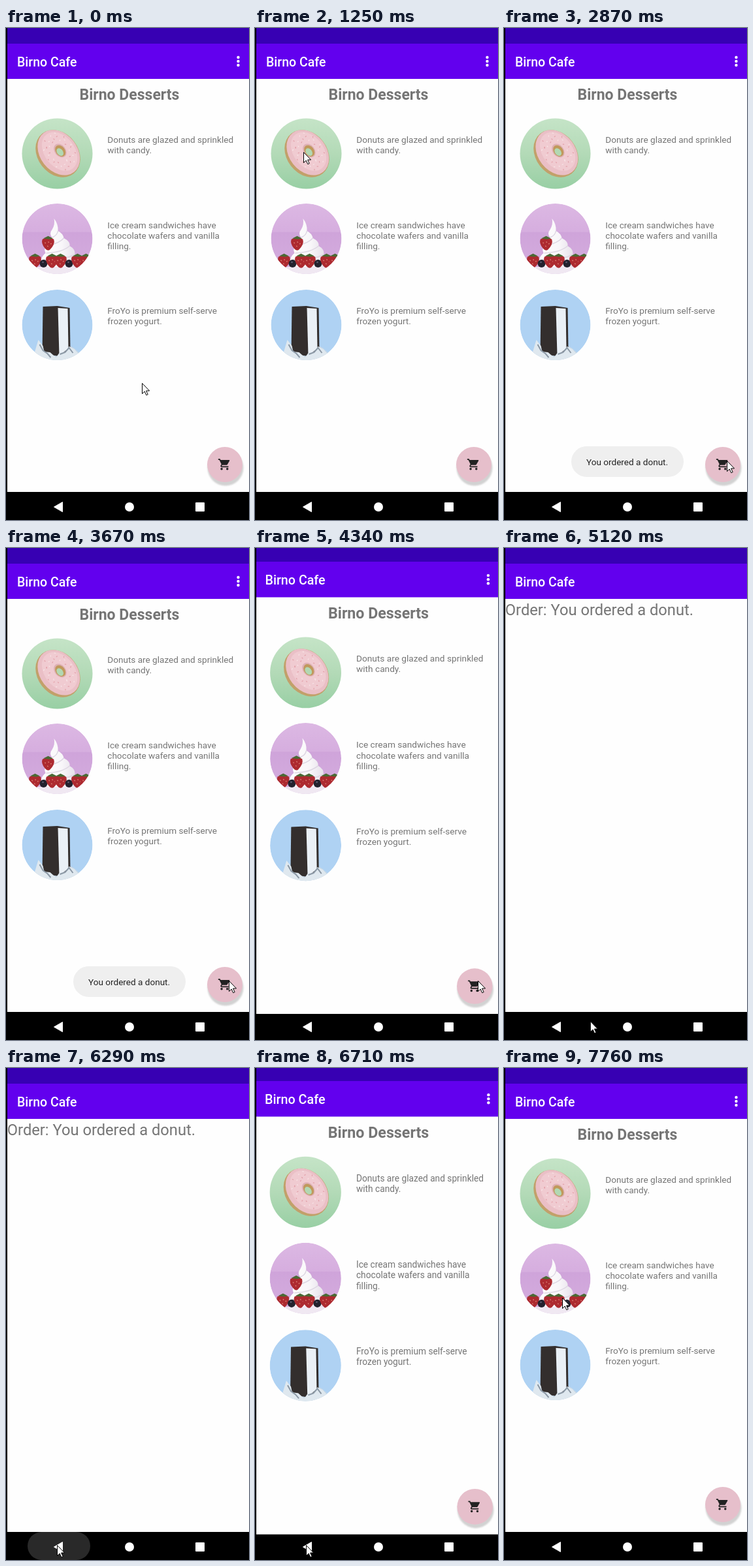
An HTML page that plays this animation: 372x754 px, repeating every 8 s.

```html
<!DOCTYPE html>
<html lang="en">
<head>
<meta charset="utf-8">
<title>Birno Cafe</title>
<style>
  html, body { margin: 0; height: 100%; overflow: hidden; background: #000; }
  svg { display: block; font-family: Roboto, sans-serif; }
  .title { font-size: 19.5px; font-weight: 500; fill: #fff; }
  .heading { font-size: 23px; font-weight: 700; fill: #757575; text-anchor: middle; }
  .text { font-size: 13.57px; fill: #757575; }
  .toast { font-size: 13.57px; fill: #222; }
  .order { font-size: 23.7px; fill: #757575; }
</style>
</head>
<body>
<svg width="372" height="754" viewBox="0 0 372 754">
  <defs>
    <linearGradient id="green" x2="0" y2="1">
      <stop offset="0" stop-color="#c5e4c7"/><stop offset=".5" stop-color="#b3dab7"/><stop offset="1" stop-color="#98cfa4"/>
    </linearGradient>
    <linearGradient id="purple" x2="0" y2="1">
      <stop offset="0" stop-color="#dcb8e3"/><stop offset=".4" stop-color="#d6aedf"/>
      <stop offset=".41" stop-color="#cfa4da"/><stop offset="1" stop-color="#d5aedf"/>
    </linearGradient>
    <linearGradient id="cream" x2="1">
      <stop offset="0" stop-color="#fff"/><stop offset=".6" stop-color="#f8f6f9"/><stop offset="1" stop-color="#e5dfe9"/>
    </linearGradient>
    <filter id="soft"><feGaussianBlur stdDeviation="1"/></filter>
    <clipPath id="disc"><circle r="54"/></clipPath>
    <clipPath id="screen"><path d="M2 0H372V754H2z"/></clipPath>
    <g id="strawberry" transform="scale(1.25)">
      <path d="M-7-5Q0-9 7-5Q9 1 2 8Q-1 10-4 6Q-9 0-7-5z" fill="#ad2a30"/>
      <path d="M-4-1l1 1M0-2l1 1M4 0l-1 1M-1 3l1 1" stroke="#dd8577"/>
      <path d="M-6-6L-2-8 0-9 2-8 6-6 1-5z" fill="#4a6a35"/>
    </g>
    <g id="blueberry"><circle r="6" fill="#23222e"/><circle cx="-1" cy="-2" r="1.3" fill="#5b5c72"/></g>
    <g id="base">
      <path d="M2 0H372V711H2z" fill="#fefefe"/>
      <path d="M2 0H372V24H2z" fill="#3700b3"/>
      <path d="M2 24H372V78H2z" fill="#6200ee"/>
      <text class="title" x="17" y="58.5">Birno Cafe</text>
    </g>
  </defs>

  <g clip-path="url(#screen)">
    <g id="menu">
      <use href="#base"/>
      <g fill="#fff"><circle cx="355.5" cy="45" r="2.2"/><circle cx="355.5" cy="51" r="2.2"/><circle cx="355.5" cy="57" r="2.2"/></g>
      <text class="heading" x="189" y="110">Birno Desserts</text>

      <g transform="translate(78.5 192.5)">
        <circle r="54" fill="url(#green)"/>
        <g transform="translate(1) rotate(52)">
          <ellipse rx="39" ry="31" fill="#c2a06a"/>
          <ellipse cx="-.5" cy="-2" rx="38" ry="28.5" fill="#eabfc6"/>
          <ellipse cx="-1" cy="-4" rx="33" ry="23" fill="#f0cbd1"/>
          <g id="sprinkles" stroke-width="1.2" stroke-linecap="round"></g>
          <ellipse cx="-1.5" cy="-5.5" rx="11.5" ry="8.5" fill="#deb0b4"/>
          <ellipse cx="-1" cy="-5.5" rx="9.5" ry="7" fill="#c0995c"/>
          <ellipse cy="-4" rx="6.5" ry="4.5" fill="#b2d8b3"/>
        </g>
      </g>

      <g transform="translate(78.5 323)"><g clip-path="url(#disc)">
        <circle r="54" fill="url(#purple)"/>
        <path d="M-54 43H54V54H-54z" fill="#f0e8f2"/>
        <path d="M-5-31Q2-22 1-12Q9-8 10-1Q20 4 19 11Q28 16 27 24Q30 34 27 43H-24Q-28 30-18 22Q-22 14-14 10Q-16 2-8-2Q-13-8-8-14Q-3-22-5-31z" fill="url(#cream)"/>
        <path d="M1-12Q0-5-8-2M10-1Q3 7-13 10M19 11Q7 21-17 22M27 24Q7 34-20 32" fill="none" stroke="#ddd6e2" stroke-width="1.5"/>
        <use href="#strawberry" x="-14" y="7"/>
        <g id="berries"></g>
      </g></g>

      <g transform="translate(78.5 455)"><g clip-path="url(#disc)">
        <circle r="54" fill="#afd2f3"/>
        <path d="M-29 24l7 8 22-3 18 2 8 5 10 9-4 12H-32l-2-14z" fill="#c6d7e6"/>
        <path d="M-22-28L0-29 19-26 20 37 3 48-23 44z" fill="#332e2d"/>
        <path d="M1-26L16-25 17 36 3 47z" fill="#eaf0f6"/>
        <path d="M-29 23l7 9 2 9 9 1 9 8 5-7 9-2 6-8 8 4 8 9-4 9H-31l-4-12z" fill="#dfe8ef"/>
        <path d="M-27 30l5 9 7 5 5 6M4 45l8-3 6-7 6 8" fill="none" stroke="#8b98a5" stroke-width="2"/>
      </g></g>

      <g id="captions" class="text"></g>

      <circle id="shadow" cx="336" cy="674" r="27.5" fill="#d2d2d2" filter="url(#soft)"/>
      <circle cx="335" cy="669" r="27" fill="#e6bfcb"/>
      <circle id="press" cx="335" cy="669" r="24" fill="#fff"/>
      <path transform="translate(324 658.4) scale(.87)" fill="#222" d="M7 18a2 2 0 1 0 0 4a2 2 0 1 0 0-4zM1 2v2h2l3.6 7.6-1.35 2.45C4.5 15.4 5.5 17 7 17h12v-2H7.4q-.3-.1-.2-.4l.9-1.6h7.45q1.2 0 1.75-1l3.6-6.5A1 1 0 0 0 20 4H5.2l-.9-2zM17 18a2 2 0 1 0 0 4a2 2 0 1 0 0-4z"/>
    </g>

    <g id="order">
      <use href="#base"/>
      <text class="order" x="1.8" y="103">Order: You ordered a donut.</text>
    </g>

    <g id="toast">
      <rect x="103" y="641" width="172" height="47" rx="23.5" fill="#efefef"/>
      <text class="toast" x="126" y="670">You ordered a donut.</text>
    </g>

    <rect id="ripple" x="33" y="711" width="96" height="43" rx="21.5" fill="#fff" opacity=".16"/>
    <g fill="#fff">
      <path d="M73.5 734L86.5 726.5V741.5z" stroke="#fff" stroke-linejoin="round"/>
      <circle cx="189" cy="734" r="7"/>
      <rect x="290" y="727" width="14" height="14" rx="1"/>
    </g>
  </g>

  <path id="cursor" d="M.5.5V16.5L4.2 13 6.8 18.7 9.2 17.6 6.6 12H11.6z" fill="#fff" stroke="#000"/>
</svg>

<script>
const LOOP = 8000;
const el = id => document.getElementById(id);
const set = (id, name, value) => el(id).setAttribute(name, value);
const ramp = (t, start, end) => Math.min(1, Math.max(0, (t - start) / (end - start)));
const easeOut = p => p * (2 - p);
const zoom = s => `translate(187 377) scale(${s}) translate(-187 -377)`;

// Pointer gestures: start, end, target x, target y.
const home = [208, 544];
const gestures = [
  [620, 960, 21, 175], [960, 1250, 74, 190],   // tap the donut
  [2380, 2850, 341, 663],                      // to the cart
  [4650, 5120, 132, 725], [5120, 5700, 78, 731], // to the back button
  [7080, 7320, 61, 397], [7320, 7760, 89, 352] // to the next dessert
];
const pointer = t => gestures.reduce(([x, y], [start, end, toX, toY]) => {
  const p = easeOut(ramp(t, start, end));
  return [x + (toX - x) * p, y + (toY - y) * p];
}, home);

const captions = [
  ['Donuts are glazed and sprinkled', 'with candy.'],
  ['Ice cream sandwiches have', 'chocolate wafers and vanilla', 'filling.'],
  ['FroYo is premium self-serve', 'frozen yogurt.']
];
el('captions').innerHTML = captions.map((lines, row) => lines.map((line, i) =>
  `<text x="155.3" y="${176 + 131 * row + 16 * i}">${line}</text>`).join('')).join('');

el('sprinkles').innerHTML = Array.from({ length: 36 }, (_, i) => {
  const angle = i * 2.4, r = .5 + (i * 7 % 17) / 40;
  const x = -1 + 35 * r * Math.cos(angle), y = -4 + 25 * r * Math.sin(angle);
  const color = i % 2 ? '#e2a0a8' : '#f7e4e6';
  return `<path d="M${x} ${y}l${1.4 * Math.cos(i)} ${1.4 * Math.sin(i)}" stroke="${color}"/>`;
}).join('');

el('berries').innerHTML = Array.from({ length: 7 }, (_, i) => i % 3 === 1
  ? `<use href="#blueberry" x="${13 * i - 34}" y="38"/>`
  : `<use href="#strawberry" x="${13 * i - 34}" y="34"/>`).join('');

function draw(now) {
  const t = now % LOOP;
  const opening = ramp(t, 4190, 4580) ** 3;
  const closed = t >= 6710;
  const menuScale = closed ? 1 + .0115 * (1 - ramp(t, 6710, 6950))
    : opening < 1 ? 1 + .15 * opening : 1;
  const press = t >= 3400 ? .28 * (1 - ramp(t, 3450, 3670)) : 0;

  set('cursor', 'transform', `translate(${pointer(t)})`);
  set('menu', 'transform', zoom(menuScale));
  set('order', 'transform', zoom(.85 + .15 * opening));
  set('order', 'opacity', closed ? 0 : ramp(t, 4430, 4580));
  set('toast', 'opacity', ramp(t, 1750, 2230) * (1 - ramp(t, 4080, 4220)));
  set('press', 'opacity', press);
  set('shadow', 'cy', 674 + 8 * press);
  set('ripple', 'visibility', t >= 6290 && t < 6440 ? 'visible' : 'hidden');
  requestAnimationFrame(draw);
}
draw(0);
</script>
</body>
</html>
```
